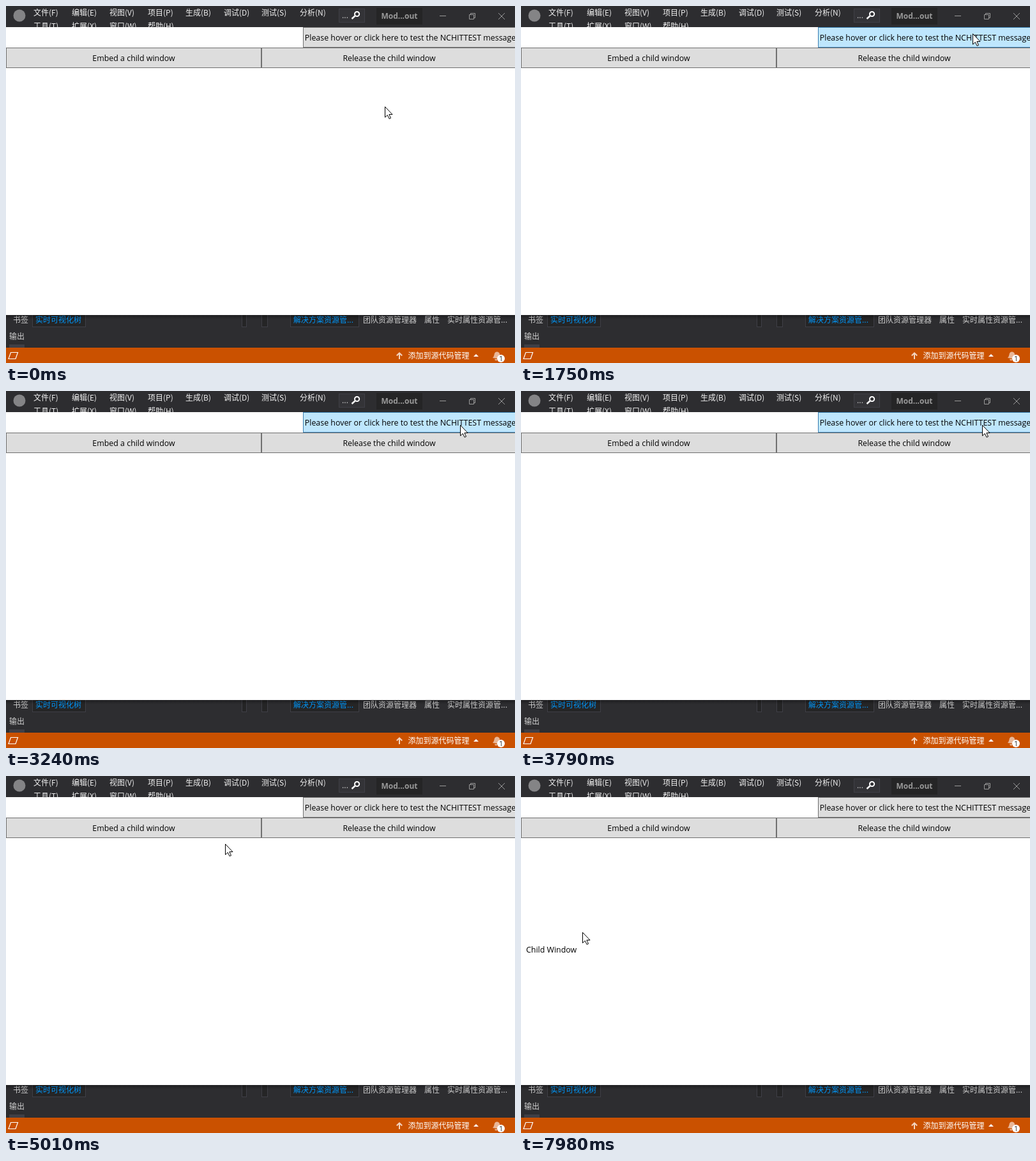
An HTML page with a canvas for the animation above (8000 ms loop, 797 by 558 pixels).

```html
<!DOCTYPE html>
<html lang="zh-CN">
<head>
<meta charset="utf-8">
<title>Child window demo</title>
<style>
html, body { margin: 0; width: 100%; height: 100%; overflow: hidden; background: #2d2d30; }
canvas { display: block; }
</style>
</head>
<body>
<canvas id="stage" width="797" height="558"></canvas>
<script>
const ctx = document.getElementById('stage').getContext('2d');
const W = 797, H = 558, LOOP = 8000;
const TOP = 33, ROW = 32, DOCK = 483, STATUS = 534;
const CJK = '12px "Noto Sans CJK SC", sans-serif';
const UI = '12.4px "Open Sans", "Noto Sans", sans-serif';
const BOLD = 'bold 12px "Open Sans", "Noto Sans", sans-serif';
const BADGE = '10px "Open Sans", sans-serif';

// The pointer rests between moves; bow bends a move downwards
const home = { x: 593, y: 157 };
const moves = [
  { from: 370, to: 880, x: 614, y: 44 },
  { from: 880, to: 1150, x: 623, y: 44 },
  { from: 1180, to: 1770, x: 707, y: 43 },
  { from: 1970, to: 2620, x: 652, y: 51 },
  { from: 2850, to: 3240, x: 711, y: 53 },
  { from: 3240, to: 4470, x: 737, y: 53 },
  { from: 4490, to: 5250, x: 222, y: 94, bow: 32 },
  { from: 5330, to: 5510, x: 225, y: 90 },
  { from: 7060, to: 7540, x: 98, y: 230 },
  { from: 7700, to: 7980, x: 96, y: 244 }
];
const clicks = [1970, 3400, 4000, 6370];
const CLICK = 110, EMBED = 6490;

const buttons = [
  { x: 465, y: TOP, w: 336, label: 'Please hover or click here to test the NCHITTEST message' },
  { x: 0, y: TOP + ROW, w: 400, label: 'Embed a child window' },
  { x: 400, y: TOP + ROW, w: 400, label: 'Release the child window' }
];
const looks = {
  normal: ['#dddddd', '#707070'],
  hover: ['#bee6fd', '#3c7fb1'],
  pressed: ['#c4e5f6', '#2c628b']
};

const icons = {
  pointer: new Path2D('M.5 .5v16.5l3.8-3.5 2.8 5.8 2.4-1.1-2.6-5.7h5.1z'),
  lens: new Path2D('M546.5 15.5l-5 4.5'),
  ring: new Path2D('M546 12.5a3.6 3.6 0 1 1 7.2 0a3.6 3.6 0 1 1-7.2 0'),
  frame: new Path2D('M679 15.5h10M725.5 13.5h7v7h-7zM727.5 13v-1.5h7v7h-1.5M771 11l10 10m0-10l-10 10'),
  task: new Path2D('M7.5 541.5h11l-3.5 10h-11z'),
  push: new Path2D('M616 552v-9m-4.2 3.5l4.2-4.2 4.2 4.2'),
  caret: new Path2D('M732 548l4-4 4 4z'),
  bell: new Path2D('M762 550q2-2 2.5-5q.5-5 5-4.5q4 1 3.5 5q0 4 1.5 6.5zM765 552h4v2h-3z')
};

function rect(x, y, w, h, fill, edge) {
  ctx.fillStyle = fill;
  ctx.fillRect(x, y, w, h);
  if (edge) {
    ctx.strokeStyle = edge;
    ctx.lineWidth = 1;
    ctx.strokeRect(x + .5, y + .5, w - 1, h - 1);
  }
}

function text(s, x, y, color, font = CJK, align = 'left') {
  ctx.font = font;
  ctx.fillStyle = color;
  ctx.textAlign = align;
  ctx.fillText(s, x, y);
}

function fill(icon, color) {
  ctx.fillStyle = color;
  ctx.fill(icon);
}

function stroke(icon, color, width = 1) {
  ctx.strokeStyle = color;
  ctx.lineWidth = width;
  ctx.stroke(icon);
}

function disc(x, y, r, color) {
  ctx.beginPath();
  ctx.arc(x, y, r, 0, Math.PI * 2);
  ctx.fillStyle = color;
  ctx.fill();
}

// Labels side by side with an even gap
function flow(labels, x, y, gap, color) {
  for (const s of labels) {
    text(s, x, y, color);
    x += ctx.measureText(s).width + gap;
  }
}

function menu(labels, y) {
  labels.split(' ').forEach((s, i) => text(s, 43 + Math.round(i * 59.5), y, '#f1f1f1'));
}

function pointerAt(t) {
  let { x, y } = home;
  for (const m of moves) {
    if (t < m.from) break;
    const u = Math.min(1, (t - m.from) / (m.to - m.from));
    const e = u * u * (3 - 2 * u);
    x += (m.x - x) * e;
    y += (m.y - y) * e + (m.bow || 0) * Math.sin(Math.PI * e);
  }
  return { x: Math.round(x), y: Math.round(y) };
}

function drawTitleBar() {
  rect(0, 0, W, H, '#2d2d30');
  disc(21, 15, 9.5, '#848486');
  menu('文件(F) 编辑(E) 视图(V) 项目(P) 生成(B) 调试(D) 测试(S) 分析(N)', 15);
  menu('工具(T) 扩展(X) 窗口(W) 帮助(H)', 36);

  rect(521, 4, 41, 22, '#333337', '#3f3f46');
  text('...', 526, 19, '#d0d0d0');
  stroke(icons.ring, '#fff', 2);
  stroke(icons.lens, '#fff', 2.4);

  rect(580, 3, 72, 26, '#252526');
  text('Mod...out', 616, 20, '#999', BOLD, 'center');
  stroke(icons.frame, '#999');
}

function tab(x, w, label = '') {
  rect(x, DOCK - 3, w, 22, '#252526', '#3f3f46');
  text(label, x + 5, 495, '#0097fb');
}

function drawDock() {
  tab(41, 84, '实时可视化树');
  tab(369, 8);
  tab(400, 10);
  tab(445, 108, '解决方案资源管...');
  text('书签', 11, 495, '#d0d0d0');
  flow(['团队资源管理器', '属性', '实时属性资源管...'], 559, 495, 12, '#d0d0d0');
  text('输出', 5, 521, '#d0d0d0');
  rect(5, 529, 24, 5, '#3f3f46');

  const shade = ctx.createLinearGradient(0, DOCK, 0, DOCK + 7);
  shade.addColorStop(0, 'rgba(0,0,0,.3)');
  shade.addColorStop(1, 'rgba(0,0,0,0)');
  rect(0, DOCK, W, 7, shade);
}

function drawStatus() {
  rect(0, STATUS, W, H - STATUS, '#ca5100');
  stroke(icons.task, '#fff', 1.2);
  stroke(icons.push, '#f3d5c0', 2);
  text('添加到源代码管理', 629.5, 551, '#fff');
  fill(icons.caret, '#fff');
  fill(icons.bell, '#e9b797');
  disc(775, 551, 6, '#fff');
  text('1', 775, 554.5, '#1e1e1e', BADGE, 'center');
}

function drawButton(b, p, down) {
  const over = p.x >= b.x && p.x < b.x + b.w && p.y >= b.y && p.y < b.y + ROW;
  const [face, edge] = looks[!over ? 'normal' : down ? 'pressed' : 'hover'];
  rect(b.x, b.y, b.w, ROW, face, edge);
  text(b.label, b.x + b.w / 2, b.y + 21, '#000', UI, 'center');
}

function drawPointer(p, down) {
  if (down) disc(p.x + .5, p.y, 12, 'rgba(240,240,40,.62)');
  ctx.save();
  ctx.translate(p.x, p.y);
  fill(icons.pointer, '#fff');
  stroke(icons.pointer, '#000');
  ctx.restore();
}

function draw(t) {
  const p = pointerAt(t);
  const down = clicks.some(c => t >= c && t < c + CLICK);
  drawTitleBar();
  drawDock();
  drawStatus();
  rect(0, TOP, W, DOCK - TOP, '#fff');
  buttons.forEach(b => drawButton(b, p, down));
  if (t >= EMBED) text('Child Window', 8, 276, '#000', UI);
  drawPointer(p, down);
}

const start = performance.now();
function tick() {
  draw((performance.now() - start) % LOOP);
  requestAnimationFrame(tick);
}
tick();
</script>
</body>
</html>
```
